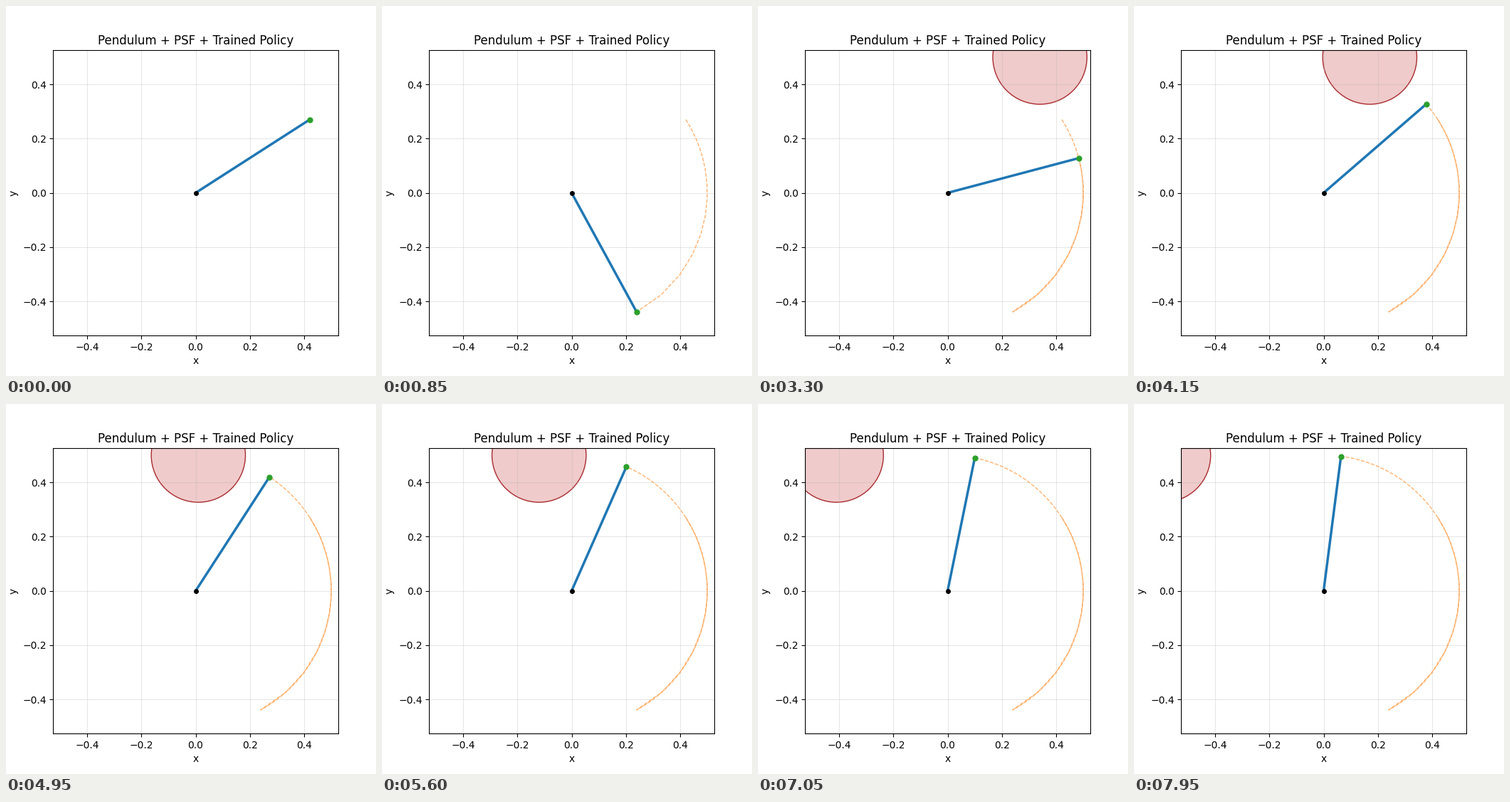
Write a matplotlib script that moves like this. It is 520x520 px and loops after 8000 ms.

```python
import numpy as np
import matplotlib.pyplot as plt
from matplotlib.animation import FuncAnimation
from matplotlib.patches import Circle

FRAMES, STEP_MS = 160, 50
LENGTH = 0.5
LIMIT = 1.05 * LENGTH
START, STOP = 1.0, 2.642        # angle from upright, rad
T_FALL, T_RISE = 0.85, 1.9      # end of the fall, start of the swing-up, s
FALL_RATE = np.arccosh(STOP / START) / T_FALL
RISE_RATE = 0.5


def angle(t):
    """Unstable fall from rest, a held pose, then a slow decay to upright."""
    fall = START * np.cosh(FALL_RATE * np.minimum(t, T_FALL))
    rise = np.exp(-RISE_RATE * np.maximum(t - T_RISE, 0))
    return fall * rise


times = np.arange(FRAMES) * STEP_MS / 1000
theta = angle(times)
bob_x, bob_y = LENGTH * np.sin(theta), LENGTH * np.cos(theta)
obstacle_x = 1.0 - 0.2 * times

fig, ax = plt.subplots(figsize=(5.2, 5.2), dpi=100)
ax.set_aspect("equal")
ax.set_xlim(-LIMIT, LIMIT)
ax.set_ylim(-LIMIT, LIMIT)
ax.set_xticks([-0.4, -0.2, 0, 0.2, 0.4])
ax.set_yticks([-0.4, -0.2, 0, 0.2, 0.4])
ax.grid(True, alpha=0.3)
ax.set_xlabel("x")
ax.set_ylabel("y")
ax.set_title("Pendulum + PSF + Trained Policy")

obstacle = Circle((obstacle_x[0], 0.5), 0.1735, lw=1,
                  facecolor=(0.78, 0.2, 0.2, 0.25), edgecolor="#a82a2e")
ax.add_patch(obstacle)
trail, = ax.plot([], [], "--", color="tab:orange", lw=1, alpha=0.6)
rod, = ax.plot([], [], color="tab:blue", lw=2.5)
bob, = ax.plot([], [], "o", color="tab:green", ms=5)
ax.plot(0, 0, "o", color="black", ms=4)


def draw(i):
    x, y = bob_x[i], bob_y[i]
    obstacle.center = obstacle_x[i], 0.5
    trail.set_data(bob_x[:i + 1], bob_y[:i + 1])
    rod.set_data([0, x], [0, y])
    bob.set_data([x], [y])
    return obstacle, trail, rod, bob


anim = FuncAnimation(fig, draw, frames=FRAMES, interval=STEP_MS,
                     repeat=True, repeat_delay=0)
plt.show()
```
